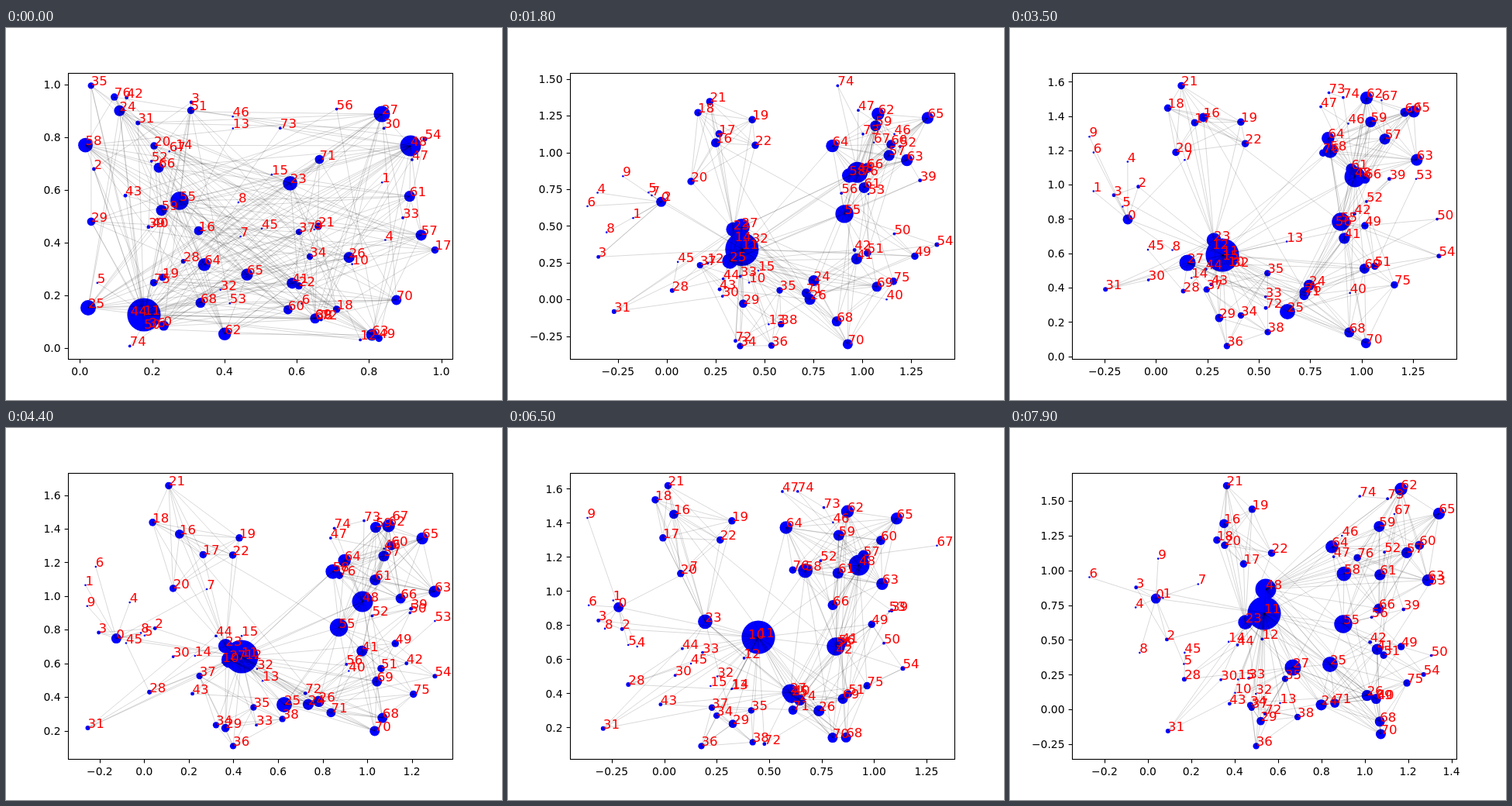
Animation of 640x480 px, one loop 8000 ms. Source, as an HTML page with a canvas:

```html
<!DOCTYPE html>
<html lang="en">
<head>
<meta charset="utf-8">
<style>
html, body { margin: 0; width: 100%; height: 100%; overflow: hidden; background: #fff; }
canvas { display: block; }
</style>
</head>
<body>
<canvas id="stage" width="640" height="480"></canvas>
<script>
const ctx = document.getElementById('stage').getContext('2d');
const STEPS = 80, STEP_MS = 100, COUNT = 77, SETTLE = 11;
const BOX = { left: 80, top: 57.6, right: 576, bottom: 427.2 };
// The outermost nodes always touch these bounds: [low, high] for x and y
const BOUNDS = [[102.5, 553.5], [74.4, 410.4]];
const mix = (a, b, u) => a + (b - a) * u;

// Steps at which the hub paths and the axis limits are given
const KEYS = [0, 11, 26, 35, 53, 65, 79];

const HUBS = {
  11: [178,370, 286,306, 320,262, 274,293, 334,297, 323,270, 328,239],
  25: [106,361, 228,276, 353,329, 358,366, 360,348, 366,345, 413,305],
  27: [485,111, 342,230, 255,287, 229,303, 348,295, 364,341, 365,309],
  48: [522,152, 468,168, 431,207, 445,192, 475,256, 453,177, 330,208],
  55: [224,223, 436,238, 432,242, 427,250, 432,265, 423,282, 430,253]
};
const LIMITS_X = [-.033,1.031, -.464,1.512, -.53,1.423, -.409,1.461, -.275,1.303, -.449,1.383, -.35,1.423];
const LIMITS_Y = [-.041,1.045, -.549,1.502, -.243,1.589, -.016,1.653, .078,1.814, .014,1.695, -.356,1.702];

// Where each community settles: members, centre, radius
const GROUPS = [
  ['0-9', 165, 228, 62],
  ['10 12-15', 285, 305, 50],
  ['16-22', 250, 125, 60],
  ['23', 270, 245, 0],
  ['24 26', 375, 320, 40],
  ['28 30 31 45', 180, 320, 60],
  ['29 34-38', 290, 355, 65],
  ['32 33 43 44 72', 255, 315, 55],
  ['39 52', 485, 215, 60],
  ['40 42', 430, 335, 60],
  ['41', 440, 270, 0],
  ['46 47 67', 435, 140, 80],
  ['49-51 53 54 56', 475, 260, 70],
  ['58', 400, 190, 0],
  ['57 59-66', 460, 145, 65],
  ['68-71 75', 430, 345, 60],
  ['73 74 76', 405, 110, 70]
];

// Sets in which every node is linked to every other
const CLIQUES = ['16-23', '11 23-25 27', '11 24-27', '11 29 34-38', '48 58-66',
  '48 55 57-59 61-65', '48 58 62-66 76', '25 41 68-71 75', '11 24 25 27 68-70'];

// First node is linked to each of the others
const STARS = ['0 1-9 11', '2 3', '11 2 3 10 12-15 28 31-33 43 44 48 49 51 55 58 64 71 72',
  '23 12 29-31', '24 41 42 50', '25 39 40 42 48 55', '26 16 43 49 51 54 55 72',
  '27 28 29 31 33 43 48 58 71 72', '28 44 45', '30 31', '39 52 55', '41 42 55 57 62',
  '46 47', '48 47 68 69 71 73-75', '49 50 51 54-56', '51 52-55', '55 16 54 56',
  '57 67', '58 70', '73 74'];

function expand(text) {
  return text.split(' ').flatMap(part => {
    const [a, b = a] = part.split('-').map(Number);
    return Array.from({ length: b - a + 1 }, (_, i) => a + i);
  });
}

const links = new Map();
const link = (a, b) => links.set(Math.min(a, b) * COUNT + Math.max(a, b), [a, b]);
for (const group of CLIQUES.map(expand))
  group.forEach((a, i) => group.slice(i + 1).forEach(b => link(a, b)));
for (const [hub, ...rest] of STARS.map(expand)) rest.forEach(n => link(hub, n));

const degree = Array(COUNT).fill(0);
for (const [a, b] of links.values()) { degree[a]++; degree[b]++; }

let seed = 7;
function random() {
  seed = (seed * 1664525 + 1013904223) % 4294967296;
  return seed / 4294967296;
}

// Random walk with a pull to zero
function makeWalk(size) {
  let v = 0;
  return Array.from({ length: STEPS }, () => v = v * .9 + (random() * 2 - 1) * size);
}

// Members fill their community's disc evenly; nodes with few links wander more
const free = [];
for (const [members, cx, cy, radius] of GROUPS) {
  const list = expand(members);
  list.forEach((n, i) => {
    const r = radius * Math.sqrt(i / list.length), angle = i * 2.4 + cx;
    const size = 24 / (1 + degree[n] / 8);
    free[n] = {
      start: BOUNDS.map(([lo, hi]) => mix(lo, hi, random())),
      home: [cx + r * Math.cos(angle), cy + r * Math.sin(angle)],
      walk: [makeWalk(size), makeWalk(size)]
    };
  });
}

// Pair of values on a keyed track at step k
function track(list, k) {
  let i = 0;
  while (i < KEYS.length - 2 && k >= KEYS[i + 1]) i++;
  const u = (k - KEYS[i]) / (KEYS[i + 1] - KEYS[i]);
  return [0, 1].map(c => mix(list[2 * i + c], list[2 * i + 2 + c], u));
}

function layout(k) {
  const u = Math.min(1, k / SETTLE);
  const nodes = degree.map((_, n) => {
    if (HUBS[n]) return track(HUBS[n], k);
    const { start, home, walk } = free[n];
    return [0, 1].map(c => mix(start[c], home[c] + walk[c][k], u));
  });
  BOUNDS.forEach(([lo, hi], c) => {
    const values = nodes.filter((_, n) => free[n]).map(p => p[c]);
    const min = Math.min(...values), max = Math.max(...values);
    nodes.forEach((p, n) => {
      if (free[n]) p[c] = mix(lo, hi, (p[c] - min) / (max - min));
    });
  });
  return nodes;
}

function ticks([lo, hi]) {
  const raw = (hi - lo) / 9, unit = 10 ** Math.floor(Math.log10(raw));
  const factor = [1, 2, 2.5, 5, 10].find(f => f * unit >= raw);
  const step = factor * unit, list = [];
  for (let i = Math.ceil(lo / step); i * step <= hi; i++) {
    const text = Math.abs(i * step).toFixed(factor === 2.5 ? 2 : 1);
    list.push({ at: (i * step - lo) / (hi - lo), text: (i < 0 ? '\u2212' : '') + text });
  }
  return list;
}

function line(x1, y1, x2, y2) {
  ctx.beginPath();
  ctx.moveTo(x1, y1);
  ctx.lineTo(x2, y2);
  ctx.stroke();
}

function drawAxes(k) {
  ctx.strokeStyle = ctx.fillStyle = '#000';
  ctx.lineWidth = 1.11;
  ctx.strokeRect(80.5, 58.5, 496, 369);
  ctx.font = '13.89px "DejaVu Sans", sans-serif';
  ctx.textAlign = 'center';
  for (const { at, text } of ticks(track(LIMITS_X, k))) {
    const x = mix(BOX.left, BOX.right, at), px = Math.round(x) + .5;
    line(px, 427.5, px, 432.4);
    ctx.fillText(text, x, 447.6);
  }
  ctx.textAlign = 'right';
  for (const { at, text } of ticks(track(LIMITS_Y, k))) {
    const y = mix(BOX.bottom, BOX.top, at), py = Math.round(y) + .5;
    line(75.6, py, 80.5, py);
    ctx.fillText(text, 70.5, y + 5.2);
  }
}

function draw(k) {
  const nodes = layout(k);
  ctx.fillStyle = '#fff';
  ctx.fillRect(0, 0, 640, 480);

  ctx.fillStyle = '#00f';
  nodes.forEach(([x, y], n) => {
    ctx.beginPath();
    ctx.arc(x, y, .7 + .58 * degree[n], 0, 2 * Math.PI);
    ctx.fill();
  });

  ctx.strokeStyle = '#000';
  ctx.lineWidth = .16;
  for (const [a, b] of links.values()) line(...nodes[a], ...nodes[b]);

  drawAxes(k);

  ctx.fillStyle = '#f00';
  ctx.font = '16.67px "DejaVu Sans", sans-serif';
  ctx.textAlign = 'left';
  nodes.forEach(([x, y], n) => ctx.fillText(n, x, y));
}

const start = performance.now();
let shown = -1;
function tick() {
  const k = Math.floor((performance.now() - start) / STEP_MS) % STEPS;
  if (k !== shown) draw(shown = k);
  requestAnimationFrame(tick);
}
tick();
</script>
</body>
</html>
```
